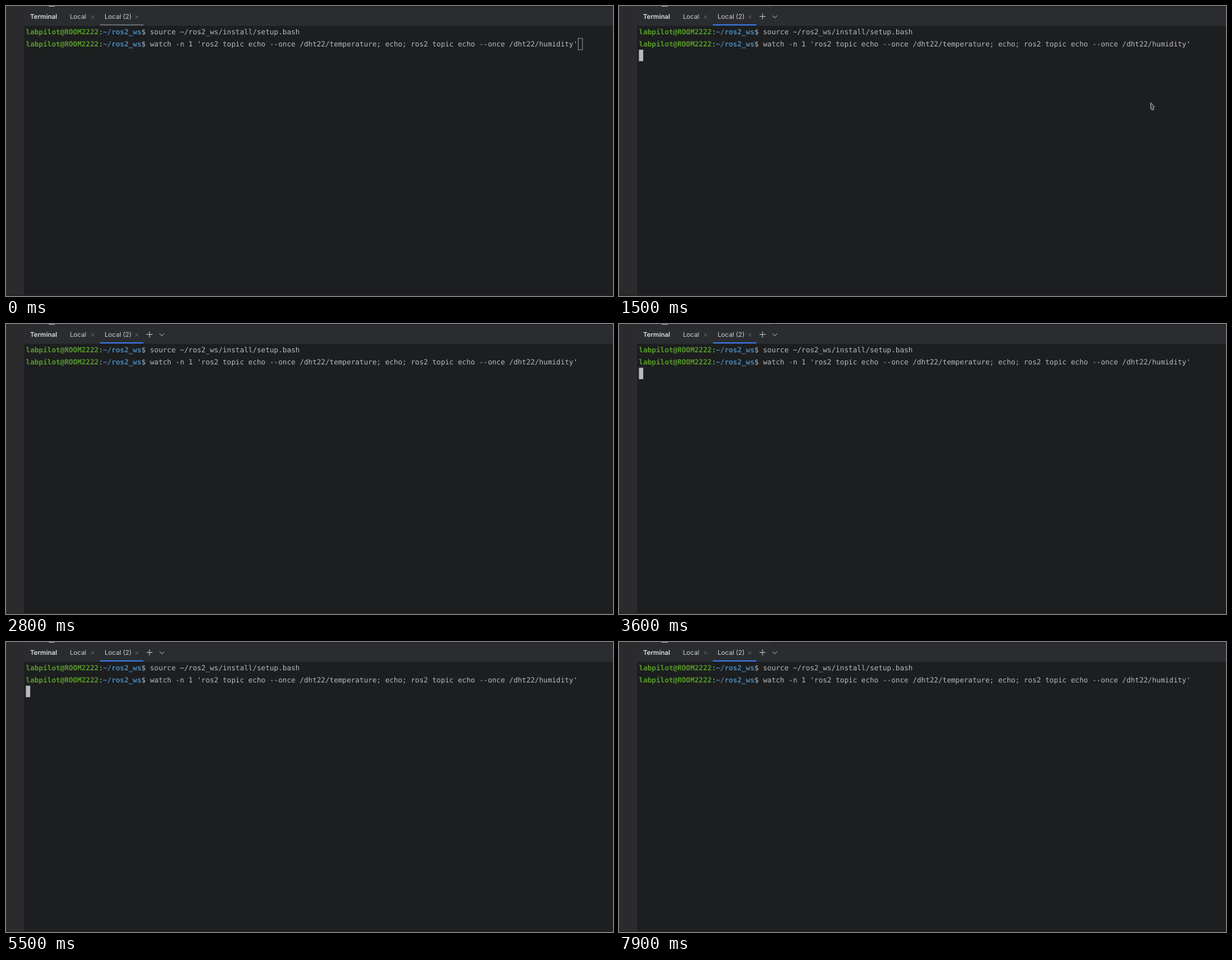
Recreate the animation shown at these times as an HTML page. Size 900x430 px, loop 8000 ms.

```html
<!DOCTYPE html>
<html lang="en">
<head>
<meta charset="utf-8">
<title>Terminal</title>
<style>
  html, body { margin: 0; width: 100%; height: 100%; overflow: hidden; background: #1d1e20; }
  svg { display: block; }
  text { white-space: pre; text-rendering: geometricPrecision; }
  .ui { font: 9.6px Inter, sans-serif; fill: #cdcfd3; }
  .title { font-weight: 600; fill: #dcdee1; }
  .mono { font: 10.54px "DejaVu Sans Mono", monospace; fill: #b8bac0; }
  .user { font-weight: bold; fill: #569b2a; }
  .path { font-weight: bold; fill: #4688b8; }
  .icon { fill: none; stroke: #b9bbc0; stroke-width: 1; }
  .close { fill: none; stroke: #74777d; stroke-width: .8; }
</style>
</head>
<body>
<svg width="900" height="430" viewBox="0 0 900 430">
  <rect width="900" height="430" fill="#1d1e20"/>
  <rect width="27" height="430" fill="#2b2a2c"/>
  <rect width="1" height="430" fill="#30343b"/>
  <rect x="27" width="873" height="29.5" fill="#2a2c2f"/>
  <rect x="226" width="674" height="1.2" fill="#1e1f22"/>
  <rect y="428.8" width="900" height="1.2" fill="#262325"/>

  <path d="M63.5 -3V.4H72V-3" class="icon"/>
  <text class="ui" x="75" y=".3">src</text>

  <g class="ui">
    <text class="title" x="35.7" y="19.1">Terminal</text>
    <text x="94.7" y="19.1">Local</text>
    <text x="146.2" y="19.1">Local (2)</text>
  </g>
  <path class="close" d="M126.2 14.1l4.4 4.4m0-4.4l-4.4 4.4M191.8 14.1l4.4 4.4m0-4.4l-4.4 4.4"/>
  <rect id="underline" x="139" y="27" width="65" height="2" rx="1"/>
  <path id="tools" class="icon" d="M208.3 15.5h9M212.8 11v9M227.7 14.3l3.4 3.2 3.4-3.2"/>

  <g id="lines" class="mono"></g>
  <rect id="caret"/>
  <path id="mouse" d="M788.2 143.5L793.8 149.2L792 150.4L793 153.4L791 154L788.4 152.4Z"
        fill="#3a3b3f" stroke="#c6c7c9" stroke-width=".9" stroke-linejoin="round"/>
</svg>
<script>
const LOOP = 8000, FOCUS = 300, ENTER = 900, MOUSE_OUT = 2300, BLINK = 505;
const $ = id => document.getElementById(id);
const commands = [
  "source ~/ros2_ws/install/setup.bash",
  "watch -n 1 'ros2 topic echo --once /dht22/temperature; echo; ros2 topic echo --once /dht22/humidity'"
];
$("lines").innerHTML = commands.map((cmd, i) =>
  `<text x="29.6" y="${42.4 + 17.4 * i}"><tspan class="user">labpilot@ROOM2222</tspan>:` +
  `<tspan class="path">~/ros2_ws</tspan>$ ${cmd}</text>`).join("");

const show = (el, on) => el.setAttribute("visibility", on ? "visible" : "hidden");

function setCaret(x, y, width, height, fill, stroke) {
  const attrs = { x, y, width, height, fill, stroke, "stroke-width": .8 };
  for (const key in attrs) $("caret").setAttribute(key, attrs[key]);
}

function draw(t) {
  const focused = t >= FOCUS, entered = t >= ENTER;
  $("underline").setAttribute("fill", focused ? "#3871d6" : "#60646b");
  show($("tools"), focused);
  show($("mouse"), focused && t < MOUSE_OUT);
  if (entered) setCaret(29.5, 64.8, 6.4, 17, "#b8babe", "none");
  else if (focused) setCaret(848.2, 47.5, 6.6, 17, "#b8babe", "none");
  else setCaret(848.5, 47.9, 6.3, 17, "none", "#a4a6aa");
  show($("caret"), !entered || (t - ENTER) % BLINK < BLINK / 2);
}

const start = performance.now();
function tick() {
  draw((performance.now() - start) % LOOP);
  requestAnimationFrame(tick);
}
tick();
</script>
</body>
</html>
```
